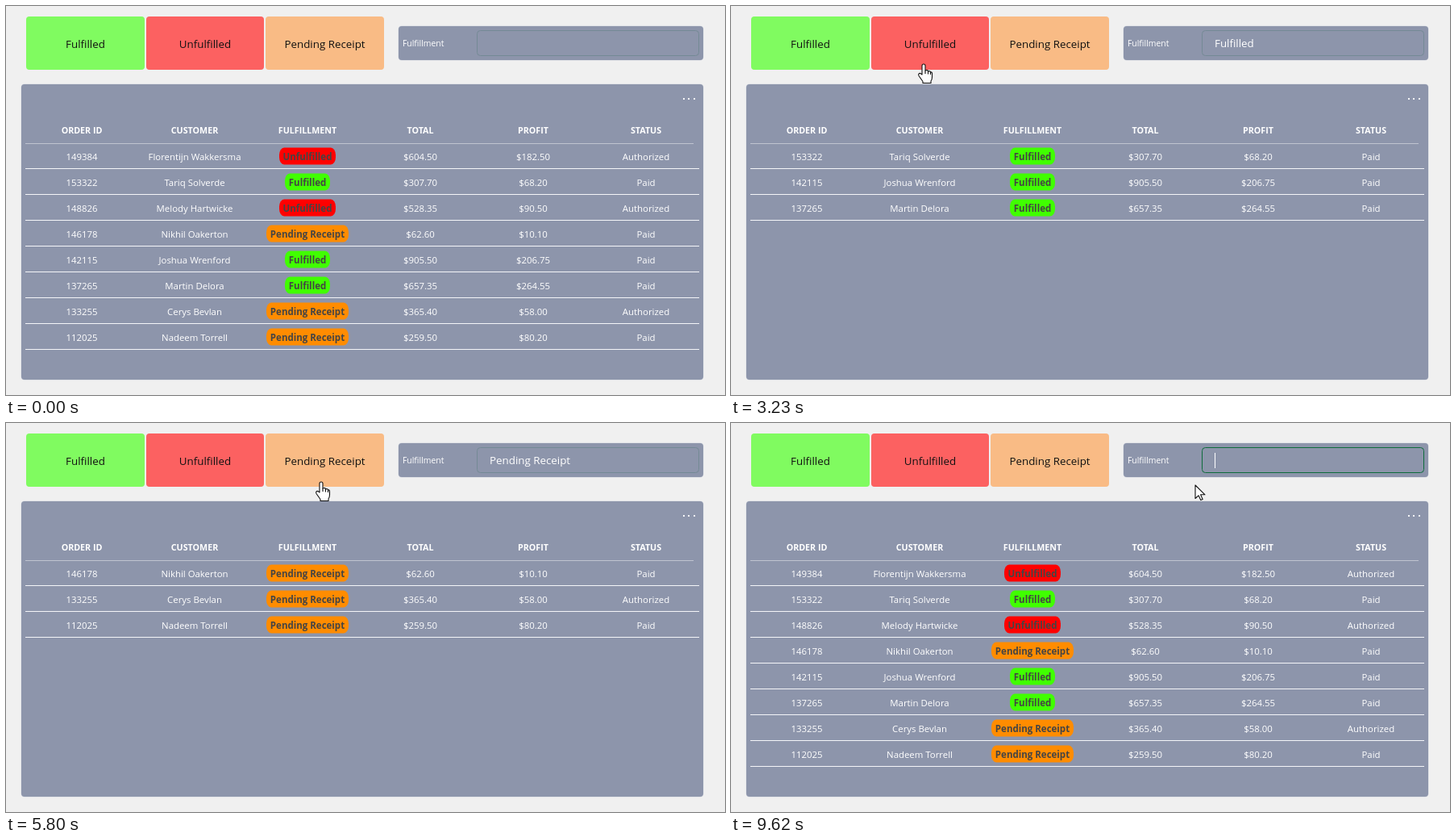
Recreate the animation shown at these times as an HTML page with a canvas. Size 892 px wide and 482 px high, loop 9690 ms.

```html
<!DOCTYPE html>
<html lang="en">
<head>
<meta charset="utf-8">
<title>Order fulfillment</title>
<style>
  html, body { margin: 0; width: 100%; height: 100%; overflow: hidden; background: #f0f0f0; }
  canvas { display: block; width: 892px; height: 482px; }
</style>
</head>
<body>
<canvas id="stage" width="892" height="482"></canvas>
<script>
const ctx = document.getElementById('stage').getContext('2d');
const LOOP = 9690;
const SANS = '"Open Sans", "Noto Sans", sans-serif';
const FONT = {
  button: '13.35px ' + SANS,
  label: '10.4px ' + SANS,
  cell: '11.4px ' + SANS,
  head: 'bold 10.7px ' + SANS,
  pill: 'bold 11.5px ' + SANS
};
const PANEL = '#8d95ab';
const F = 'Fulfilled', U = 'Unfulfilled', P = 'Pending Receipt';

const buttons = [
  { text: F, x: 25, w: 147, fill: '#80fb60' },
  { text: U, x: 174, w: 146, fill: '#fc6161' },
  { text: P, x: 322, w: 147, fill: '#f9bb85' }
];
const pills = {
  [F]: { w: 56, fill: '#40ff00' },
  [U]: { w: 70, fill: '#ff0000' },
  [P]: { w: 102, fill: '#ff8c00' }
};
const columns = [94, 234, 374, 514, 654, 794];
const heads = ['ORDER ID', 'CUSTOMER', 'FULFILLMENT', 'TOTAL', 'PROFIT', 'STATUS'];
const orders = [
  ['149384', 'Florentijn Wakkersma', U, '$604.50', '$182.50', 'Authorized'],
  ['153322', 'Tariq Solverde', F, '$307.70', '$68.20', 'Paid'],
  ['148826', 'Melody Hartwicke', U, '$528.35', '$90.50', 'Authorized'],
  ['146178', 'Nikhil Oakerton', P, '$62.60', '$10.10', 'Paid'],
  ['142115', 'Joshua Wrenford', F, '$905.50', '$206.75', 'Paid'],
  ['137265', 'Martin Delora', F, '$657.35', '$264.55', 'Paid'],
  ['133255', 'Cerys Bevlan', P, '$365.40', '$58.00', 'Authorized'],
  ['112025', 'Nadeem Torrell', P, '$259.50', '$80.20', 'Paid']
];

// Pointer moves: start, end, steps, then a quadratic curve
const moves = [
  [260, 940, 11, -10, 166, 60, 130, 114, 72],
  [2350, 3230, 14, 114, 72, 138, 108, 239, 72],
  [4160, 5100, 15, 239, 72, 300, 117, 391, 76],
  [5170, 5170, 1, 391, 76, 391, 74, 391, 73],
  [6260, 7140, 14, 391, 73, 500, 116, 715, 46],
  [7270, 7760, 8, 715, 46, 609, 46, 567, 45],
  [8290, 8430, 3, 567, 45, 570, 46, 572, 47],
  [9150, 9220, 2, 572, 47, 571, 47, 570, 47],
  [9560, 9620, 2, 570, 47, 573, 62, 576, 77]
];
const presses = [[1410, 1620], [3360, 3570], [5370, 5580], [7270, 7900]];
const DRAG = 7270, RELEASE = 7900, CLEARED = 8290, REFRESH = 8700;

const hand = new Path2D('M-2 13V2Q-2 0 0 0T2 2V8Q5 6.8 5.5 9Q8 8 8.5 10Q10.5 9.5 10.5 12V16' +
  'Q10.5 19 9 21V23.5H-1V21.5L-6 14.5Q-7 12.5 -5.5 11.5Q-4 11 -2 13Z');
const knuckles = new Path2D('M2 8V12M5.5 9V12.5M8.5 10V13');
const arrow = new Path2D('M0 0V16.5L4 12.8L6.8 18.6L9.2 17.6L6.6 11.8H12Z');

const within = (t, [from, to]) => t >= from && t < to;

function pointerAt(t) {
  const m = moves.filter(move => move[0] <= t).pop();
  if (!m) return null;
  const [start, end, n, x0, y0, cx, cy, x1, y1] = m;
  const gap = n > 1 ? (end - start) / (n - 1) : 1;
  const s = Math.min(n, Math.floor((t - start) / gap + 0.001) + 1) / n;
  const curve = (a, c, b) => (1 - s) ** 2 * a + 2 * s * (1 - s) * c + s * s * b;
  return { x: curve(x0, cx, x1), y: curve(y0, cy, y1) };
}

function box(x, y, w, h, r, fill) {
  ctx.beginPath();
  ctx.roundRect(x, y, w, h, r);
  ctx.fillStyle = fill;
  ctx.fill();
}

function write(text, x, y, font, color = '#fff', align = 'center') {
  ctx.font = font;
  ctx.fillStyle = color;
  ctx.textAlign = align;
  ctx.fillText(text, x, y);
}

function rule(x, y, w, color) {
  ctx.fillStyle = color;
  ctx.fillRect(x, y, w, 1);
}

function panel(x, y, w, h) {
  box(x - 0.5, y - 0.5, w + 1, h + 1, 4.5, '#d3d7e0');
  box(x, y, w, h, 4, PANEL);
}

function drawTable(filter) {
  panel(19, 97, 846, 366);
  for (const x of [840, 846, 853]) box(x, 114, 2, 2, 0.6, '#fff');
  heads.forEach((head, i) => write(head, columns[i], 158, FONT.head));
  rule(24, 170, 829, '#bfc4d0');
  orders.filter(row => !filter || row[2] === filter).forEach((row, r) => {
    const y = 191 + r * 32;
    row.forEach((cell, i) => {
      const pill = i === 2 && pills[cell];
      if (pill) {
        box(columns[i] - pill.w / 2, y - 15.5, pill.w, 21, { x: 6, y: 9 }, pill.fill);
        write(cell, columns[i], y, FONT.pill, '#444');
      } else {
        write(cell, columns[i], y, FONT.cell);
      }
    });
    rule(24, y + 10, 836, '#f4f5f8');
  });
}

// Left edge of the selection, snapped to a letter boundary
function selectionEdge(text, x) {
  ctx.font = FONT.button;
  let best = 600;
  for (let i = 1; i <= text.length; i++) {
    const edge = 600 + ctx.measureText(text.slice(0, i)).width;
    if (Math.abs(edge - x) < Math.abs(best - x)) best = edge;
  }
  return best;
}

const overInput = p => p && p.x > 584 && p.x < 860 && p.y > 30 && p.y < 62;

function drawSearch(t, text, pointer) {
  panel(487, 25, 378, 42);
  write('Fulfillment', 492, 50, FONT.label, '#fff', 'left');
  if (t >= DRAG && text) {
    const left = selectionEdge(text, pointer.x + 8);
    ctx.fillStyle = '#1b50c3';
    ctx.fillRect(left, 31, 600 + ctx.measureText(text).width - left, 30);
  }
  write(text, 600, 51, FONT.button, '#fff', 'left');
  ctx.beginPath();
  ctx.roundRect(584.5, 30.5, 275, 31, 4);
  ctx.lineWidth = 1;
  ctx.strokeStyle = t >= DRAG ? '#0f6c3c' : overInput(pointer) ? '#3f7766' : '#748a95';
  ctx.stroke();
  const blinkOn = Math.floor((t - CLEARED) / 530) % 2 === 0;
  if (t >= CLEARED && blinkOn) {
    ctx.fillStyle = '#fff';
    ctx.fillRect(600, 37, 1, 19);
  }
}

function drawPointer(t, p) {
  if (presses.some(span => within(t, span))) {
    ctx.beginPath();
    ctx.arc(p.x, p.y, 12, 0, Math.PI * 2);
    ctx.fillStyle = 'rgba(255,255,0,0.5)';
    ctx.fill();
  }
  if (overInput(p) || within(t, [DRAG, RELEASE])) return;
  const onButton = p.y > 13 && p.y < 79 && buttons.some(b => p.x >= b.x && p.x < b.x + b.w);
  const shape = onButton ? hand : arrow;
  ctx.save();
  ctx.translate(p.x, p.y);
  ctx.lineJoin = 'round';
  ctx.lineWidth = 1.1;
  ctx.fillStyle = '#fff';
  ctx.strokeStyle = '#111';
  ctx.fill(shape);
  ctx.stroke(shape);
  if (onButton) ctx.stroke(knuckles);
  ctx.restore();
}

function filterAt(t) {
  return t < 1550 ? '' : t < 3500 ? F : t < 5520 ? U : t < REFRESH ? P : '';
}

function draw(t) {
  const pointer = pointerAt(t);
  const filter = filterAt(t);
  ctx.fillStyle = '#f0f0f0';
  ctx.fillRect(0, 0, 892, 482);
  for (const b of buttons) {
    box(b.x, 13, b.w, 66, 4, b.fill);
    write(b.text, b.x + b.w / 2, 52, FONT.button, '#111');
  }
  drawSearch(t, t < CLEARED ? filter : '', pointer);
  drawTable(filter);
  if (pointer) drawPointer(t, pointer);
}

function tick() {
  draw(performance.now() % LOOP);
  requestAnimationFrame(tick);
}
tick();
</script>
</body>
</html>
```
